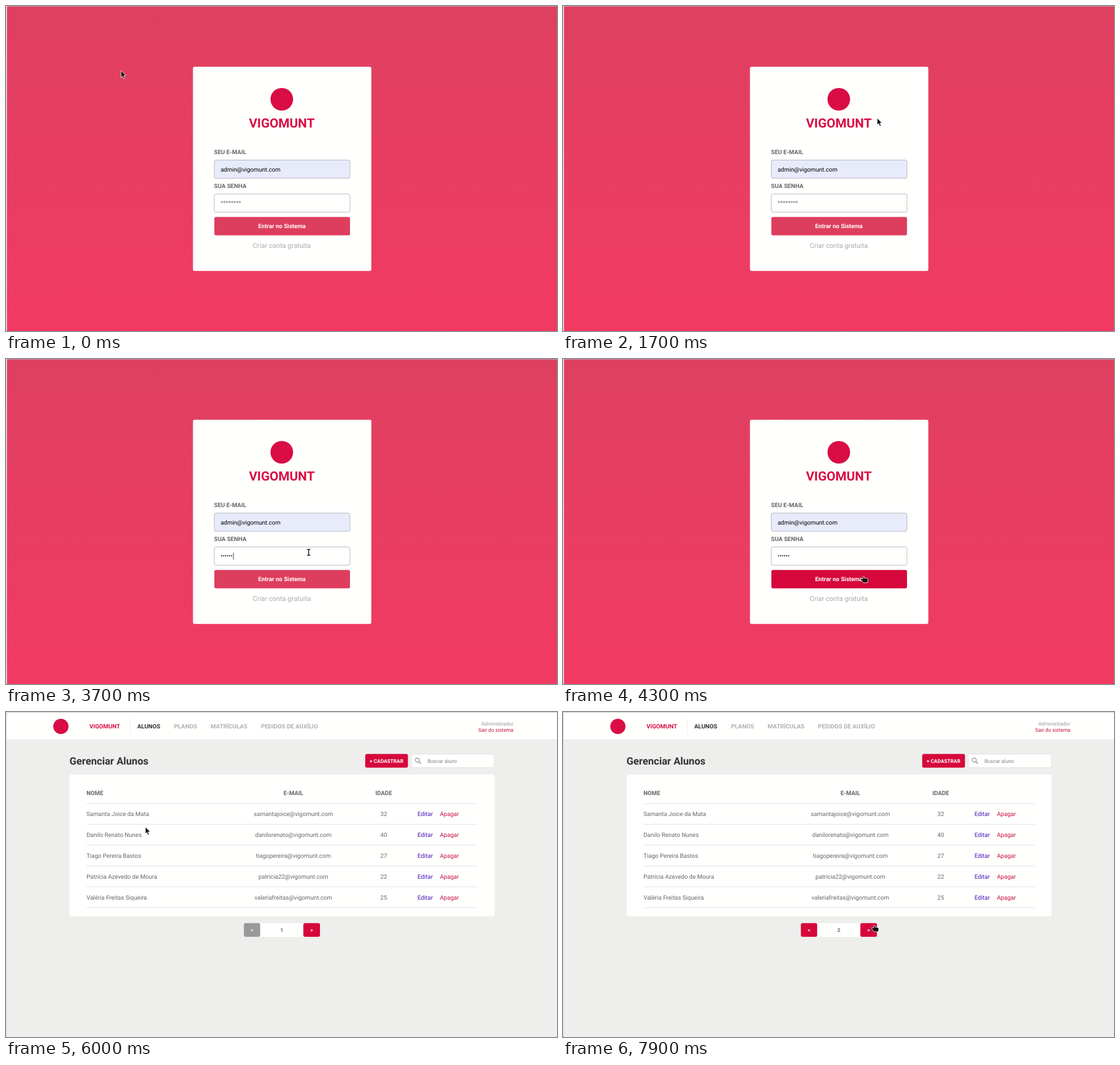
Recreate the animation shown at these times as an HTML page. Size 974x575 px, loop 8000 ms.

```html
<!DOCTYPE html>
<html lang="pt-BR">
<head>
<meta charset="utf-8">
<title>Painel da academia</title>
<style>
html, body { margin: 0; width: 100%; height: 100%; overflow: hidden; }
svg { display: block; width: 974px; height: 575px; }
text { font: 10.5px Roboto, sans-serif; white-space: pre; text-rendering: geometricPrecision; }
</style>
</head>
<body>
<svg id="stage" viewBox="0 0 974 575" xmlns="http://www.w3.org/2000/svg"></svg>
<script>
const RED = '#d6083b', MARK = '#d90d44', PINK = [222, 62, 94], DEEP = [214, 8, 59];
const BRAND = 'VIGOMUNT', DOMAIN = '@vigomunt.com';

const rect = (x, y, w, h, fill, r = 0, more = '') =>
  `<rect x="${x}" y="${y}" width="${w}" height="${h}" rx="${r}" fill="${fill}" ${more}/>`;

function text(s, x, y, fill, { size = 10.5, bold = false, anchor = 'start', id = '' } = {}) {
  return `<text x="${x}" y="${y}" fill="${fill}" text-anchor="${anchor}" ${id && `id="${id}"`}
    style="font-size:${size}px;font-weight:${bold ? 700 : 400}">${s}</text>`;
}

const mid = { anchor: 'middle' };
const midBold = { anchor: 'middle', bold: true };
const small = { anchor: 'middle', bold: true, size: 9 };
const border = c => `stroke="${c}" stroke-width="0.8"`;

function loginView() {
  return rect(0, 0, 974, 575, 'url(#sky)')
    + rect(0, 0, 974, 1, '#c9a3ae') + rect(1, 0, 0.8, 575, '#f3d3da')
    + rect(330.5, 107.6, 315.3, 361.2, '#fffffe', 3)
    + `<circle cx="487.5" cy="165" r="20" fill="${MARK}"/>`
    + text(BRAND, 487.5, 215, MARK, { ...midBold, size: 22.5 })
    + text('SEU E-MAIL', 367.7, 262.3, '#666', { bold: true })
    + rect(368.2, 272.6, 239.8, 32.2, '#e8ebfa', 3, border('#a5a5ab'))
    + text('admin' + DOMAIN, 379.4, 292.5, '#000')
    + text('SUA SENHA', 367.7, 322.3, '#666', { bold: true })
    + rect(368.2, 332.6, 239.8, 32.2, '#fffffe', 3, border('#a5a5a5'))
    + text('********', 379.4, 352.3, '#777', { id: 'hint' })
    + text('', 379.4, 352.3, '#222', { id: 'pass' })
    + rect(0, 343, 0.9, 12, '#222', 0, 'id="caret"')
    + rect(368.3, 373.3, 239.8, 32.4, RED, 3, 'id="enter"')
    + text('Entrar no Sistema', 487.7, 393.2, '#fff', midBold)
    + text('Criar conta gratuita', 487.6, 428.3, '#aaa', { ...mid, size: 12 });
}

const students = [
  ['Samanta Joice da Mata', 'samantajoice', 32],
  ['Danilo Renato Nunes', 'danilorenato', 40],
  ['Tiago Pereira Bastos', 'tiagopereira', 27],
  ['Patrícia Azevedo de Moura', 'patricia22', 22],
  ['Valéria Freitas Siqueira', 'valeriafreitas', 25]
];

const line = y => rect(142, y - 0.4, 692, 0.9, '#dedede');

function studentRow([name, user, age], i) {
  const y = 184.3 + 36.8 * i;
  return text(name, 142.2, y, '#666')
    + text(user + DOMAIN, 508, y, '#666', mid)
    + text(age, 667.7, y, '#666', mid)
    + text('Editar', 727.5, y, '#430fb3')
    + text('Apagar', 767, y, '#c70d3f')
    + line(198.8 + 36.8 * i);
}

function listView() {
  const menu = [['ALUNOS', 232], ['PLANOS', 297], ['MATRÍCULAS', 361.7], ['PEDIDOS DE AUXÍLIO', 450.7]];
  return rect(0, 0, 974, 575, '#eeeeed')
    + rect(0, 0, 974, 50, '#fffffe') + rect(0, 49.2, 974, 0.8, '#dcdcdc')
    + rect(0, 0, 974, 1, '#c9c9c9') + rect(1, 0, 0.6, 575, '#e3e3e3')
    + `<circle cx="97" cy="25.5" r="13.5" fill="${MARK}"/>`
    + text(BRAND, 147.5, 29.3, MARK, { bold: true })
    + rect(219, 12, 0.8, 27, '#e8e8e8')
    + menu.map(([s, x], i) => text(s, x, 29.3, i ? '#b0b0b0' : '#333', { bold: true })).join('')
    + text('Administrador', 897, 24, '#999', { size: 9, anchor: 'end' })
    + text('Sair do sistema', 897, 34.7, '#c70d3f', { size: 9, anchor: 'end' })
    + text('Gerenciar Alunos', 112.3, 92.5, '#333', { size: 18, bold: true })
    + rect(635, 74.2, 75.5, 24.3, RED, 3)
    + text('+ CADASTRAR', 672.6, 89.6, '#fff', small)
    + rect(716.5, 74.5, 146.6, 23.8, '#fffffe', 3, border('#dddddd'))
    + '<path d="M729.7 87.7l3.6 3.6" stroke="#999" stroke-width="1.7"/>'
    + '<circle cx="727" cy="85" r="3.5" fill="none" stroke="#999" stroke-width="1.3"/>'
    + text('Buscar aluno', 745, 89.6, '#808080', { size: 9 })
    + rect(112.5, 110.5, 751, 251, '#fffffe', 3)
    + text('NOME', 142.2, 147.2, '#666', { bold: true })
    + text('E-MAIL', 508, 147.2, '#666', midBold)
    + text('IDADE', 667.7, 147.2, '#666', midBold)
    + line(162) + students.map(studentRow).join('')
    + rect(440, 373.6, 95, 24.2, '#fffffe')
    + rect(420.5, 373.6, 28.8, 24.2, '#999', 3, 'id="prev"')
    + rect(525.6, 373.6, 29.4, 24.2, RED, 3)
    + text('&lt;', 434.9, 388.7, '#fff', small)
    + text('1', 487.6, 388.7, '#666', { ...small, id: 'page' })
    + text('&gt;', 540.3, 388.7, '#fff', small);
}

// Every cursor has its hotspot at 0,0
const cursors = {
  arrow: '<path d="M.3 .3V12.4L3 9.9L5 14.6L7.2 13.6L5.2 9.1H8.9Z" fill="#111" stroke="#fff" stroke-width=".8"/>',
  beam: '<path d="M-3-5.2H3M-3 5.2H3M0-5V5" stroke="#fff" stroke-width="3"/>'
    + '<path d="M-3-5.2H3M-3 5.2H3M0-5V5" stroke="#222" stroke-width="1.6"/>',
  hand: '<path d="M-.9 5V1Q.2-.4 1.4 1V3.6L3.4 3.7L5.4 4.1L7.2 4.7Q8.3 5.2 8.1 7L7.2 11.8H-.6L-2.6 8.6L-5 5.4Q-4.4 3.6-2.6 4.6Z" fill="#111" stroke="#fff" stroke-width=".8" stroke-linejoin="round"/>'
};

const stage = document.getElementById('stage');
stage.innerHTML = `<defs><linearGradient id="sky" x1="0" y1="0" x2="0" y2="1">
    <stop stop-color="#de4060"/><stop offset="1" stop-color="#f23a62"/></linearGradient></defs>
  <g id="login">${loginView()}</g><g id="list">${listView()}</g>
  ${rect(0, 0, 1, 575, '#dcdcdc')}
  <g id="cursor">${Object.keys(cursors).map(k => `<g id="${k}">${cursors[k]}</g>`).join('')}</g>`;

const $ = id => document.getElementById(id);
const show = (id, on) => $(id).setAttribute('display', on ? 'inline' : 'none');

// time, x, y
const path = [
  [300, 203, 114], [500, 290, 112], [800, 550, 89], [900, 628, 64], [1000, 577, 102],
  [1200, 577, 102], [1400, 563, 141], [1500, 563, 141], [2200, 535, 342], [3800, 535, 342],
  [4100, 531, 384], [5600, 531, 384], [5800, 503, 362], [5900, 503, 362], [6000, 246, 203],
  [6100, 228, 194], [6600, 550, 377]
];
const keys = [2600, 2700, 2800, 3100, 3400, 3700];

function pointer(t) {
  const i = path.findIndex(p => p[0] >= t);
  if (i < 0) return path[path.length - 1].slice(1);
  if (i === 0) return path[0].slice(1);
  const [t0, x0, y0] = path[i - 1], [t1, x1, y1] = path[i];
  const k = (t - t0) / (t1 - t0);
  return [x0 + (x1 - x0) * k, y0 + (y1 - y0) * k];
}

function cursorKind(t, x, y) {
  const within = (l, top, r, b) => x >= l && x <= r && y >= top && y <= b;
  if (t < 4800) {
    if (within(368, 272, 608, 305) || within(368, 332, 608, 365)) return 'beam';
    return within(368, 373, 608, 406) ? 'hand' : 'arrow';
  }
  if (t >= 5300 && t < 6000) return 'arrow';
  return within(525, 373, 555, 398) ? 'hand' : 'arrow';
}

function draw(ms) {
  const t = Math.floor(ms / 100) * 100; // the screen refreshes ten times a second
  const typed = keys.filter(k => t >= k).length;
  show('login', t < 4800);
  show('list', t >= 4800);

  show('hint', !typed);
  $('pass').textContent = '•'.repeat(typed);
  show('caret', t >= 2300 && t < 4300);
  $('caret').setAttribute('x', 379.9 + 3.62 * typed);
  const heat = t < 4000 ? 0 : Math.min(1, (t - 3900) / 400);
  $('enter').setAttribute('fill', `rgb(${PINK.map((c, i) => Math.round(c + (DEEP[i] - c) * heat))})`);

  const second = t >= 7900;
  $('prev').setAttribute('fill', second ? RED : '#999');
  $('page').textContent = second ? 2 : 1;

  const [x, y] = pointer(t), kind = cursorKind(t, x, y);
  $('cursor').setAttribute('transform', `translate(${Math.round(x)} ${Math.round(y)})`);
  for (const k in cursors) show(k, k === kind);
}

const start = performance.now();
function tick(now) {
  draw(Math.max(0, now - start) % 8000);
  requestAnimationFrame(tick);
}
draw(0);
requestAnimationFrame(tick);
</script>
</body>
</html>
```
